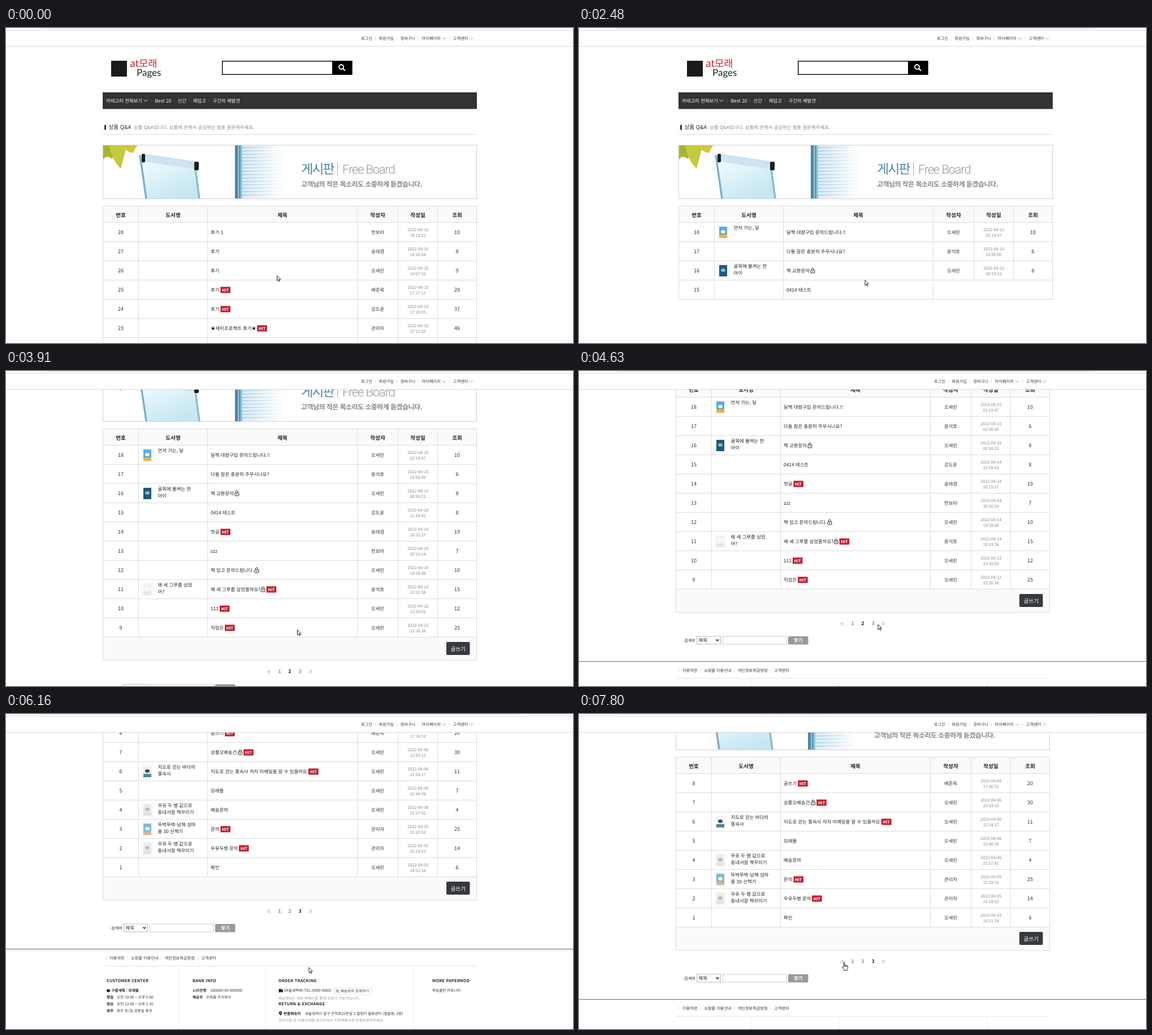
Animation of 1003 by 558 pixels, one loop 8000 ms. Source, as an HTML page:

```html
<!DOCTYPE html>
<html lang="ko">
<head>
<meta charset="utf-8">
<title>상품 Q&amp;A</title>
<style>
html, body { margin: 0; width: 100%; height: 100%; overflow: hidden; background: #fff; }
svg { display: block; width: 1003px; height: 558px; }
text { font-family: "Noto Sans CJK KR", "Noto Sans CJK", sans-serif; text-rendering: geometricPrecision; }
</style>
</head>
<body>
<svg id="stage" viewBox="0 0 1003 558"></svg>
<script>
(() => {
const FONT = '"Noto Sans CJK KR", "Noto Sans CJK", sans-serif';
const INK = '#222', LINE = '#dcdcdc', RED = '#c01c2c';
const COLS = [171.5, 234.5, 356.5, 621.5, 693.5, 763.5, 832.5];
const HEAD = 315.5, TOP = 344.5, ROW = 34;

const pen = document.createElement('canvas').getContext('2d');
function widthOf(s, size = 8.4, weight = 400) {
  pen.font = `${weight} ${size}px ${FONT}`;
  return pen.measureText(s).width;
}

const text = (x, cy, s, size = 8.4, fill = INK, more = '') =>
  `<text x="${x}" y="${cy + size * .37}" font-size="${size}" fill="${fill}" ${more}>${s}</text>`;
const MID = ' text-anchor="middle" ', BOLD = ' font-weight="700" ', MEDIUM = ' font-weight="500" ';
const rect = (x, y, w, h, fill, more = '') =>
  `<rect x="${x}" y="${y}" width="${w}" height="${h}" fill="${fill}" ${more}/>`;
const dot = (x, y, rx, ry, fill) => `<ellipse cx="${x}" cy="${y}" rx="${rx}" ry="${ry}" fill="${fill}"/>`;
const path = (d, stroke, w = 1, fill = 'none') =>
  `<path d="${d}" stroke="${stroke}" stroke-width="${w}" fill="${fill}"/>`;
const shape = (d, fill) => path(d, 'none', 0, fill);
const hline = (y, a = 171, b = 833, c = LINE) => path(`M${a} ${y}H${b}`, c);
const vline = (x, a, b, c = LINE) => path(`M${x} ${a}V${b}`, c);
const chevron = (x, y, w, c) => path(`M${x} ${y - w / 4}l${w / 2} ${w / 2}l${w / 2} ${-w / 2}`, c);
const group = (s, more = '') => `<g ${more}>${s}</g>`;
const lens = (x, y, r, w, c) =>
  `<circle cx="${x}" cy="${y}" r="${r}" fill="none" stroke="${c}" stroke-width="${w}"/>` +
  path(`M${x + r * .7} ${y + r * .7}l${r} ${r}`, c, w * 1.1);

// a row of links with thin dividers; a trailing ">" adds a drop-down mark
function menu(x, cy, labels, size, weight, fill, divider, mark) {
  return labels.split('|').map((label, i) => {
    const name = label.replace('>', '');
    let s = text(x, cy, name, size, fill, `font-weight="${weight}"`);
    if (i) s += vline(Math.round(x - 6.5) + .5, cy - 2.5, cy + 2.5, divider);
    x += widthOf(name, size, weight);
    if (name != label) {
      s += chevron(x + 3, cy, size * .85, mark);
      x += 3 + size;
    }
    x += 11.7;
    return s;
  }).join('');
}

function header() {
  return rect(-10, 0, 1020, 32, '#fff') + hline(32.5, -10, 1010, '#d9d9d9') +
    menu(628, 18.5, '로그인|회원가입|장바구니|마이페이지>|고객센터>', 7.2, 400, '#333', LINE, '#8aa');
}

function banner() {
  let s = shape('M172 208H192L188 232Q177 224 172 233Z', '#a9b52f') +
    shape('M183 208H214L203 249Q187 234 183 208Z', '#c2cb3d') +
    shape('M207 208H232L225 221Q213 221 207 208Z', '#d6c53c');
  s += shape('M241 232L335 249L344 302H248Z', 'url(#board)') +
    path('M237 225L248 302', '#7fafcb', 3.5) + path('M335 249L342 302', '#8fbad2', 3.5) +
    shape('M240 222L341 237V251L240 236Z', '#cfe3f1') +
    rect(240, 223, 6, 15, '#161c24', 'rx="2"') + rect(333, 237, 8, 15, '#161c24', 'rx="2"');
  let slats = '';
  for (let y = 212; y < 302; y += 6) slats += `M418 ${y}l74 -1.5`;
  s += rect(418, 208, 76, 94, 'url(#sky)') + path(slats, 'url(#slat)', 2) +
    rect(405, 208, 13, 94, '#9cc6da') + rect(405, 208, 5, 94, '#4d87a6') + rect(412, 208, 3, 94, '#5d9ab8');
  s += text(522, 249, '게시판', 23, '#4b86a8', MEDIUM + 'letter-spacing="-1.9"') + vline(586.5, 238, 261, '#aaa') +
    text(595, 249.5, 'Free Board', 22, '#999', 'style="font-family:Roboto,sans-serif" font-weight="300" letter-spacing="-1.2"') +
    text(522, 277, '고객님의 작은 목소리도 소중하게 듣겠습니다.', 12, '#858585', BOLD + 'letter-spacing="-.55"');
  return s + rect(171.5, 207.5, 661, 95, 'none', 'stroke="#d0d0d0"');
}

function masthead() {
  let s = rect(186, 58, 28, 28, '#1a1a1a') +
    text(219, 63, 'at모래', 17.5, '#c4242f', MEDIUM) +
    text(231, 79, 'Pages', 17, '#222', 'style="font-family:Lato,sans-serif"');
  s += rect(382.7, 58.7, 229, 23.6, '#fff', 'stroke="#000" stroke-width="1.4"') +
    rect(577, 58, 35.5, 25, '#000') + lens(593, 69, 4, 1.9, '#fff');
  s += rect(171, 114, 662, 29.5, '#333') +
    menu(177, 128.5, '카테고리 전체보기>|Best 20|신간|재입고|구간의 재발견', 8.4, 500, '#fff', '#555', '#fff');
  s += rect(174, 171.5, 3, 9, '#333', 'rx="1"') + text(181.5, 175.8, '상품 Q&amp;A', 9.6) +
    text(226, 176, '상품 Q&amp;A입니다. 상품에 관해서 궁금하신 점을 질문해주세요.', 8.4, '#888') + hline(188.5);
  s += banner() + rect(171.5, HEAD, 661, TOP - HEAD, '#fafafa', `stroke="${LINE}"`);
  ['번호', '도서명', '제목', '작성자', '작성일', '조회'].forEach((label, i) => {
    s += text((COLS[i] + COLS[i + 1]) / 2, 331, label, 9.6, INK, MID + BOLD) + vline(COLS[i], HEAD, TOP);
  });
  return s;
}

// two title lines, then cover, lower band and spot colours
const BOOKS = {
  island: ['뚜벅뚜벅-남해 섬마', '을 30 산책기', '#7fb9d8', '#d9b48c', '#eef4f6'],
  moon: ['먼저 가는, 달', '', '#58aee0', '#f0b03c', '#fff3c8'],
  alley: ['골목에 불켜는 한', '아이', '#1d5b7c', '#1d5b7c', '#8fb9bd'],
  tree: ['왜 세 그루를 심었', '어?', '#eef3f6', '#dfeaf0', '#f8fafb'],
  map: ['지도로 걷는 바다의', '풍속사', '#f1f1ee', '#4a88a5', '#45494f'],
  milk: ['우유 두 병 값으로', '동네서점 책꾸미기', '#ececec', '#e2e2e2', '#bbb']
};
function book(key, cy) {
  const [a, b, cover, band, spot] = BOOKS[key];
  return rect(240, cy - 13, 21, 26, '#fafafa') + rect(243, cy - 10, 14, 20, cover) +
    rect(243, cy + 4, 14, 6, band) + dot(250, cy - 1, 4, 3, spot) +
    text(268.5, cy - 8, a) + text(268.5, cy + 4, b);
}

// title | marks (L lock, H hit) | writer | date | time | views | book; numbers count down
const FIRST = { 1: 28, 2: 18, 3: 8 };
const ROWS = {
  1: `후기 1||한보라|04-15|18:18:21|10
후기||송태겸|04-15|18:16:04|8
후기||오세린|04-15|18:07:53|9
후기|H|배준목|04-15|17:37:17|28
후기|H|강도윤|04-15|17:30:05|37
★세미프로젝트 후기★|H|관리자|04-15|17:21:55|46
테스트 10||강도윤|04-15|16:40:04|7
상품문의드립니다.||배준목|04-15|14:55:47|9
책 문의드립니다.|L|오세린|04-15|13:11:23|4|island
ㅎㅎ||오세린|04-15|04:02:13|2`,
  2: `달책 대량구입 문의드립니다.!!||오세린|04-15|02:19:47|10|moon
다들 잠은 충분히 주무시나요?||윤석호|04-15|02:06:00|6
책 교환문의|L|오세린|04-15|00:59:22|8|alley
0414 테스트||강도윤|04-14|21:09:41|8
첫글|H|송태겸|04-14|20:15:27|19
zzz||한보라|04-14|20:10:24|7
책 입고 문의드립니다.|L|오세린|04-14|19:39:48|10
왜 세 그루를 심었을까요?|LH|윤석호|04-14|19:33:38|15|tree
111|H|오세린|04-12|23:30:02|12
직업은|H|오세린|04-12|23:26:38|25`,
  3: `글쓰기|H|배준목|04-08|17:36:52|20
상품오배송건|LH|오세린|04-06|23:43:15|30
지도로 걷는 풍속사 저자 이메일을 알 수 있을까요?|H|오세린|04-06|22:54:27|11|map
모래뜰||오세린|04-06|22:48:38|7
배송문의||오세린|04-06|21:57:41|4|milk
문의|H|관리자|04-05|15:29:52|25|island
우유두병 문의|H|관리자|04-05|15:18:53|14|milk
확인||오세린|04-03|14:51:34|6`
};

function row(line, i, no, bare) {
  const [title, marks, by, day, time, seen, key] = line.split('|');
  const y = TOP + i * ROW, cy = y + 17.5;
  let s = text(203, cy, no, 9, '#333', MID) + text(362, cy, title);
  let x = 362 + widthOf(title) + 2;
  if (marks.includes('L')) {
    s += path(`M${x + 2} ${cy - 1}v-1.6a2 2 0 0 1 4 0v1.6`, INK) +
      rect(x + .5, cy - 1, 7, 5, 'none', `rx="1" stroke="${INK}"`) + rect(x + 3.5, cy + .5, 1, 2, INK);
    x += 10;
  }
  if (marks.includes('H')) s += rect(x, cy - 5.5, 17.5, 11, RED) + text(x + 8.75, cy + .2, 'HIT', 7.2, '#fff', MID + BOLD);
  if (key) s += book(key, cy);
  if (!bare) s += text(657.5, cy, by, 8.4, '#333', MID) + text(728.7, cy - 4.5, '2022-' + day, 7.2, '#888', MID) +
    text(728.7, cy + 5.5, time, 7.2, '#888', MID) + text(798, cy, seen, 9, '#333', MID);
  COLS.forEach((c, k) => { if (!bare || k < 4 || k > 5) s += vline(c, y, y + ROW); });
  return s + hline(y + ROW);
}

function company() {
  const title = (x, y, s) => text(x, y, s, 7.2, INK, BOLD + 'letter-spacing=".3"');
  const bold = (x, y, s) => text(x, y, s, 6.6, INK, BOLD);
  const plain = (x, y, s, c = '#333') => text(x, y, s, 6.6, c);
  const [A, B, C, D] = [178, 330, 482, 754], y = 183.5, step = 12, first = y + 18;
  let s = title(A, y, 'CUSTOMER CENTER') + title(B, y, 'BANK INFO') + title(C, y, 'ORDER TRACKING') + title(D, y, 'MORE PAPERNOD');
  s += dot(A + 3, first, 3.2, 2.6, INK) + bold(A + 8.5, first, '구름새톡 : 모래뜰');
  ['평일|오전 10:00 ~ 오후 5:00', '점심|오전 12:00 ~ 오후 1:30', '휴무|휴무 토/일 공휴일 휴무'].forEach((line, i) => {
    const [name, hours] = line.split('|'), cy = first + step * (i + 1);
    s += bold(A, cy, name) + plain(A + 18, cy, hours);
  });
  s += bold(B, first, '느티은행') + plain(B + 32, first, '000000-00-000000') +
    bold(B, first + step, '예금주') + plain(B + 24, first + step, '모래뜰 주식회사');
  s += shape(`M${C + .5} ${first - 3}h4.5v1h1.800l1.400 2v2.300h-7.700z`, INK) +
    dot(C + 2.3, first + 2.5, 1.1, 1.1, INK) + dot(C + 6.3, first + 2.5, 1.1, 1.1, INK) +
    plain(C + 10, first, 'VR들녘택배 (TEL:0000-0000)') +
    rect(580.5, first - 5, 67, 12, '#fff', 'stroke="#e6e6e6"') + lens(586, first + .3, 2, .8, '#333') +
    plain(592, first + 1, '배송위치 조회하기') +
    plain(C, 215, '배송정보는 해당 택배사를 통해 조회가 가능하십니다.', '#999') +
    title(C, 225, 'RETURN &amp; EXCHANGE');
  s += shape(`M${C + 3.5} 245.5q-2.8 -3 -2.8 -4.5a2.8 2.8 0 0 1 5.6 0q0 1.5 -2.8 4.5z`, INK) + dot(C + 3.5, 241, 1, 1, '#fff') +
    bold(C + 9, 242, '반품배송지') + plain(C + 47, 242, '새솔광역시 달구 은하로25번길 3 펼침터 물류센터 (별솔동, 2층)') +
    plain(C, 254, '공지사항 및 이용안내를 참고하셔서 지정택배사로 반품요청해주세요.', '#999');
  return s + plain(D, first, '독립출판 커뮤니티');
}

// everything below the last row, measured from the table's bottom edge
function foot(page) {
  let s = rect(171.5, 0, 661, 41, '#fafafa', `stroke="${LINE}"`) +
    rect(779, 8.5, 41.5, 23, '#343a40', 'rx="2"') + text(799.8, 20.5, '글쓰기', 9.6, '#fff', MID);
  for (const n of [1, 2, 3])
    s += text(465.7 + n * 18.2, 60.5, n, 8.4, n == page ? '#111' : '#888', MID + BOLD);
  for (const x of [465.5, 468]) s += path(`M${x} 58l-2.5 3l2.5 3M${1004 - x} 58l2.5 3l-2.5 3`, '#aaa');
  s += text(182, 90.7, '· 검색어', 7.2) +
    rect(208.5, 83.5, 42, 14, '#fff', 'stroke="#bbb"') + text(211.5, 90.7, '제목') +
    path('M242.5 89l2.3 2.5l2.3 -2.5', '#111', 1.4) +
    rect(254.5, 83.5, 113, 14, '#fff', 'stroke="#ccc"') +
    rect(370, 83.5, 35.5, 14.5, '#999', 'rx="1.5"') + text(387.8, 90.7, '찾기', 8.4, '#fff', MID + BOLD);
  s += hline(128, -10, 1010, '#666') + vline(177.5, 141, 146) +
    menu(183, 143.5, '이용약관|쇼핑몰 이용안내|개인정보취급방침|고객센터', 7.2, 400, '#333', LINE) +
    hline(158, 171, 833, '#e6e6e6');
  for (const x of [305.5, 459.5, 721.5]) s += vline(x, 162, 290, '#eee');
  return s + company();
}

// a partial sheet is still loading: four rows, the last one unfinished
function sheet(page, partial) {
  const lines = ROWS[page].split('\n').slice(0, partial ? 4 : 10);
  const s = lines.map((line, i) => row(line, i, FIRST[page] - i, partial && i == 3)).join('');
  const end = TOP + lines.length * ROW;
  return group(s + (partial ? '' : group(foot(page), `transform="translate(0 ${end})"`)),
    `id="sheet${page}${partial}" display="none"`);
}

const fade = (id, a, b, more) =>
  `<linearGradient id="${id}" ${more}><stop offset="0" stop-color="${a}"/><stop offset="1" stop-color="${b}"/></linearGradient>`;
const ARROW = 'M.4 .6V9.8L2.6 7.8L4 11L5.5 10.4L4.1 7.3H6.9Z';
const HAND = 'M-1 8.5V1.2a1 1 0 0 1 2 0V5.5q3 -1 4 .8q1.5 0 1.5 1.200V10q0 2 -1.2 3.2V14.5H-.3V13.3L-3.2 9.6q-.5 -1.2 .6 -1.6q.8 -.1 1.6 1.3M1 5.5V8M3 5.8V8M4.9 6.3V8.2';

// start, page, partial
const views = [[0, 1, 0], [2480, 2, 1], [2770, 2, 0], [5350, 3, 1], [5650, 3, 0]];
// first step, last step, number of steps, goal
const scrolls = [
  [430, 820, 5, 298], [2480, 2480, 1, 0], [3210, 3650, 6, 128], [3810, 4090, 4, 298],
  [5350, 5350, 1, 0], [5760, 6260, 6, 354], [6740, 7040, 4, 239]
];
// the same, with goal x, y and 1 for the hand
const moves = [
  [280, 280, 1, 482.5, 437, 0], [1070, 1070, 1, 482.5, 437, 1], [1220, 1600, 6, 501, 439, 1],
  [1880, 2040, 2, 503, 442, 1], [2310, 2310, 1, 506, 446, 1], [2480, 2480, 1, 505.5, 446, 0],
  [3210, 3300, 2, 515, 458, 0], [4470, 4780, 5, 536, 443, 0], [5030, 5190, 3, 536, 445, 1],
  [5350, 5350, 1, 535.5, 448.5, 0], [6490, 6580, 2, 530, 438, 0],
  [7220, 7470, 4, 492, 449, 0], [7550, 7800, 4, 469, 439.7, 1]
];

// eased position along a track, held between its steps
function follow(track, t, pos) {
  for (const [from, to, n, ...goal] of track) {
    if (t < from) break;
    const step = n > 1 ? Math.floor((t - from) * (n - 1) / (to - from) + 1e-6) + 1 : 1;
    const p = Math.min(1, step / n), e = p * p * (3 - 2 * p);
    pos = pos.map((v, k) => v + (goal[k] - v) * e);
  }
  return pos;
}

const stage = document.getElementById('stage');
stage.innerHTML =
  '<defs>' + fade('board', '#f2fcfe', '#c4e7f3', 'x2=".6" y2="1"') + fade('sky', '#dcedf6', '#fff') +
  fade('slat', '#a9cfe4', '#fff', 'gradientUnits="userSpaceOnUse" x1="418" x2="490"') + '</defs>' +
  group(group(masthead() + views.map(([, page, partial]) => sheet(page, partial)).join(''), 'id="page"') + header(), 'id="wrap"') +
  rect(0, 0, 1003, 4, '#fff') + hline(.5, 67, 910, '#e4e4e4') + hline(3.5, 0, 1003, '#dadada') +
  group(path(ARROW, '#111', .9, '#fff'), 'id="arrow"') + group(path(HAND, '#111', .9, '#fff'), 'id="hand"');

const el = id => document.getElementById(id);
const show = (id, on) => el(id).setAttribute('display', on ? 'inline' : 'none');
const place = (id, x, y) => el(id).setAttribute('transform', `translate(${x} ${y})`);

function draw(t) {
  const now = views.filter(v => v[0] <= t).pop();
  const [scroll] = follow(scrolls, t, [0]);
  const [x, y, hand] = follow(moves, t, [479, 438, 0]);
  for (const v of views) show(`sheet${v[1]}${v[2]}`, v == now);
  place('wrap', now[2] ? 5 : 0, 0);
  place('page', 0, -Math.round(scroll));
  show('hand', hand > 0);
  show('arrow', hand <= 0);
  place('arrow', x, y);
  place('hand', x, y);
}

const start = performance.now();
function tick() {
  draw((performance.now() - start) % 8000);
  requestAnimationFrame(tick);
}
tick();
})();
</script>
</body>
</html>
```
